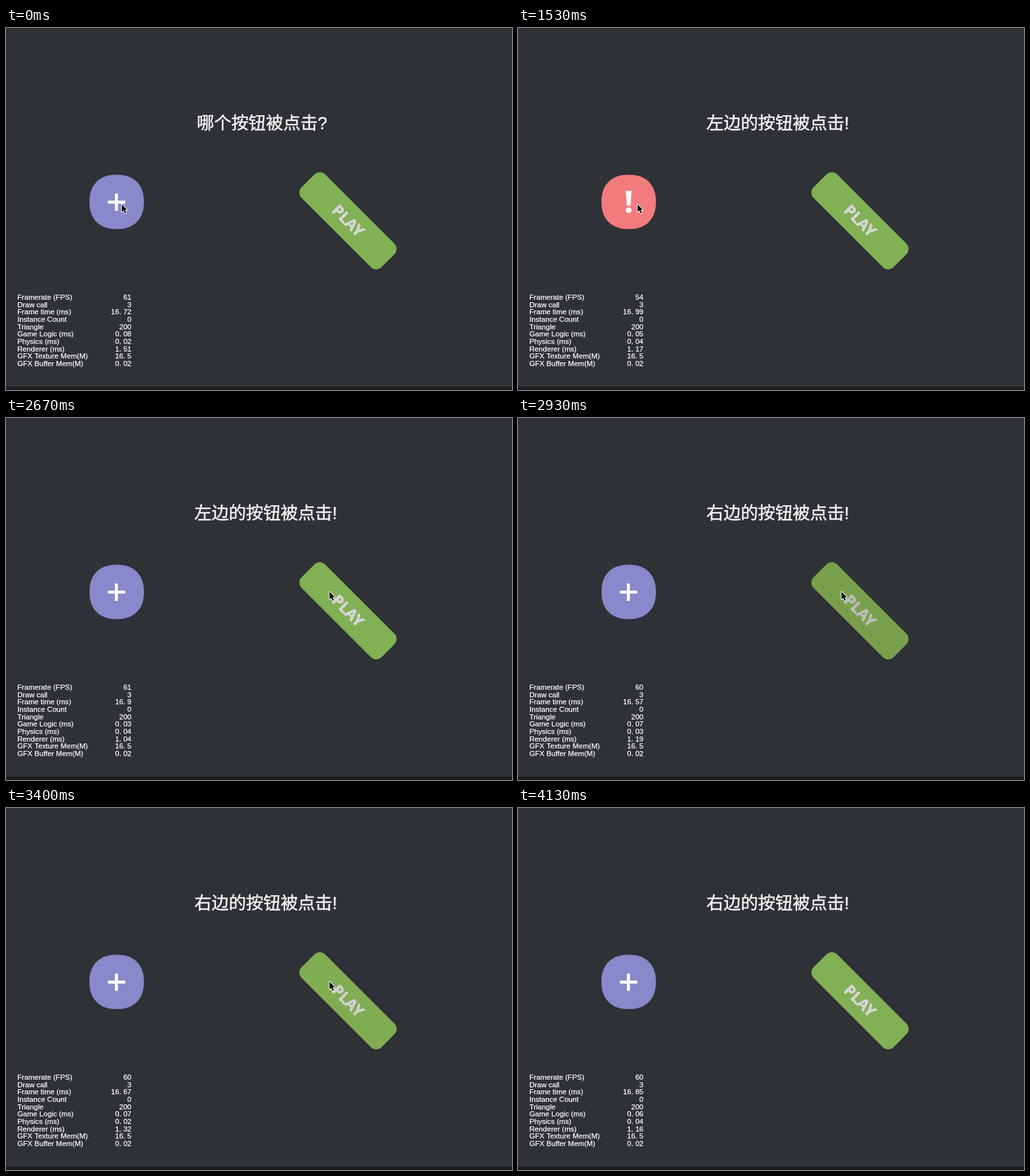
An HTML page with a canvas for the animation above (4.19 s loop, 800x573 px).

```html
<!DOCTYPE html>
<html lang="zh">
<head>
<meta charset="utf-8">
<title>Buttons</title>
<style>
  html, body { margin: 0; width: 100%; height: 100%; overflow: hidden; background: #2e3136; }
  canvas { display: block; width: 800px; height: 573px; }
</style>
</head>
<body>
<canvas id="stage" width="800" height="573"></canvas>
<script>
const ctx = document.getElementById('stage').getContext('2d');
const LOOP = 4190;
const LABELS = ['Framerate (FPS)', 'Draw call', 'Frame time (ms)', 'Instance Count', 'Triangle',
  'Game Logic (ms)', 'Physics (ms)', 'Renderer (ms)', 'GFX Texture Mem(M)', 'GFX Buffer Mem(M)'];

// start time, then fps, frame time, logic, physics, renderer
const SAMPLES = [
  [0, '61', '16. 72', '0. 08', '0. 02', '1. 51'],
  [330, '57', '17. 36', '0. 08', '0. 05', '1. 89'],
  [870, '56', '17. 12', '0. 06', '0. 04', '1. 43'],
  [1330, '54', '16. 99', '0. 05', '0. 04', '1. 17'],
  [1870, '59', '16. 81', '0. 05', '0. 03', '1. 12'],
  [2330, '61', '16. 9', '0. 03', '0. 04', '1. 04'],
  [2870, '60', '16. 57', '0. 07', '0. 03', '1. 19'],
  [3330, '60', '16. 67', '0. 07', '0. 02', '1. 32'],
  [3870, '60', '16. 85', '0. 06', '0. 04', '1. 16']
];

// time, x, y of the pointer tip
const POINTER = [
  [0, 183, 279], [470, 183, 279], [600, 189, 279], [1870, 189, 279],
  [2530, 511.5, 275], [3550, 511.5, 275], [3730, 514, 198]
];

const ramp = (t, a, b) => Math.min(1, Math.max(0, (t - a) / (b - a)));
const ease = p => p * p * (3 - 2 * p);
const mix = (a, b, p) => a + (b - a) * p;
const mixColor = (a, b, p) => `rgb(${a.map((v, i) => Math.round(mix(v, b[i], p))).join()})`;

function pointerAt(t) {
  const next = POINTER.findIndex(k => k[0] > t);
  if (next < 0) return null;
  const a = POINTER[next - 1], b = POINTER[next];
  const p = ease(ramp(t, a[0], b[0]));
  return { x: mix(a[1], b[1], p), y: mix(a[2], b[2], p) };
}

// A thin outline in the fill colour gives the slightly heavier strokes.
function text(str, x, y, font, color, weight, align = 'left') {
  ctx.font = font;
  ctx.fillStyle = ctx.strokeStyle = color;
  ctx.textAlign = align;
  ctx.lineWidth = weight;
  ctx.lineJoin = 'round';
  ctx.fillText(str, x, y);
  ctx.strokeText(str, x, y);
}

function drawTitle(t) {
  const [str, x] = t < 870 ? ['哪个按钮被点击?', 301.7]
    : [(t < 2930 ? '左' : '右') + '边的按钮被点击!', 297.7];
  text(str, x, 159.6, '27.3px "Liberation Sans", "Noto Sans CJK SC", "Noto Sans CJK", sans-serif', '#f4f4f4', 0.5);
}

function drawStats(t) {
  const [, fps, frame, logic, physics, renderer] = SAMPLES.filter(s => s[0] <= t).pop();
  const values = [fps, '3', frame, '0', '200', logic, physics, renderer, '16. 5', '0. 02'];
  const font = '11.6px "Liberation Sans", Arial, sans-serif';
  LABELS.forEach((label, i) => {
    const y = 430 + i * 11.67;
    text(label, 18, y, font, '#fff', 0.25);
    text(values[i], 198.3, y, font, '#fff', 0.25, 'right');
  });
}

function drawRoundButton(hover) {
  ctx.save();
  ctx.translate(175, 275.3);
  ctx.fillStyle = hover ? '#f17b7d' : '#8988cb';
  const bulge = v => Math.sign(v) * Math.abs(v) ** (2 / 2.3) * 43;
  ctx.beginPath();
  for (let i = 0; i < 180; i++) {
    const a = i * Math.PI / 90;
    ctx.lineTo(bulge(Math.cos(a)), bulge(Math.sin(a)));
  }
  ctx.fill();

  ctx.fillStyle = '#fafafa';
  ctx.beginPath();
  if (hover) {
    ctx.moveTo(-4.5, -17.5);
    ctx.lineTo(4.5, -17.5);
    ctx.lineTo(3, 6);
    ctx.lineTo(-3, 6);
    ctx.closePath();
    ctx.moveTo(4.5, 13.2);
    ctx.arc(0, 13.2, 4.5, 0, Math.PI * 2);
  } else {
    ctx.rect(-14, -2, 27.5, 4.8);
    ctx.rect(-2.8, -13.3, 4.8, 27.5);
  }
  ctx.fill();
  ctx.restore();
}

function drawPlayButton(press) {
  ctx.save();
  ctx.translate(540.7, 305.2);
  ctx.rotate(Math.PI / 4);
  ctx.fillStyle = mixColor([130, 176, 84], [120, 160, 76], press);
  ctx.beginPath();
  ctx.roundRect(-89.4, -26.3, 178.8, 52.6, 12);
  ctx.fill();
  text('PLAY', 0, 8.4, 'bold 24.3px "Noto Sans", "Open Sans", sans-serif',
    mixColor([214, 214, 214], [190, 190, 190], press), 0.8, 'center');
  ctx.restore();
}

function drawPointer({ x, y }) {
  ctx.save();
  ctx.translate(x, y);
  ctx.beginPath();
  ctx.moveTo(0, 0);
  ctx.lineTo(0, 12);
  ctx.lineTo(2.7, 9.5);
  ctx.lineTo(4.8, 14.3);
  ctx.lineTo(6.8, 13.4);
  ctx.lineTo(4.8, 8.7);
  ctx.lineTo(8.4, 8.7);
  ctx.closePath();
  ctx.lineJoin = 'round';
  ctx.lineWidth = 2;
  ctx.strokeStyle = '#fff';
  ctx.stroke();
  ctx.fillStyle = '#000';
  ctx.fill();
  ctx.restore();
}

function draw(t) {
  const pointer = pointerAt(t);
  ctx.fillStyle = '#2e3136';
  ctx.fillRect(0, 0, 800, 573);
  ctx.fillStyle = '#191b1d';
  ctx.fillRect(0, 568, 800, 5);
  drawTitle(t);
  drawStats(t);
  drawRoundButton(t >= 470 && pointer !== null && pointer.x < 218);
  drawPlayButton(ramp(t, 2830, 2930) - ramp(t, 3320, 3420));
  if (pointer) drawPointer(pointer);
}

const start = performance.now();
function tick() {
  draw((performance.now() - start) % LOOP);
  requestAnimationFrame(tick);
}
tick();
</script>
</body>
</html>
```
